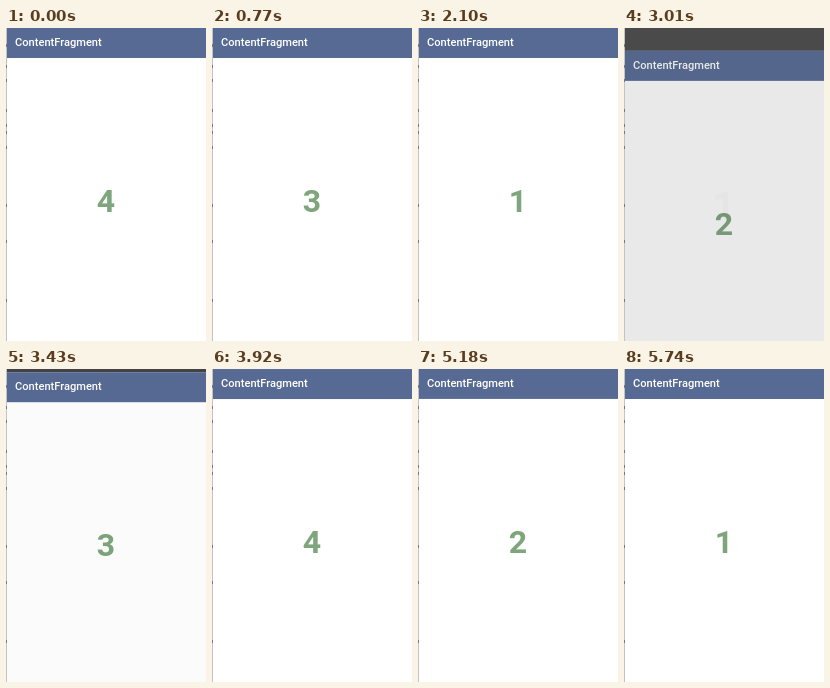
Write an HTML page that moves like this. It is 200 px wide and 313 px high and loops after 5.81 s.

```html
<!DOCTYPE html>
<html lang="en">
<head>
<meta charset="utf-8">
<title>ContentFragment</title>
<style>
  html, body {
    margin: 0;
    width: 100%;
    height: 100%;
    overflow: hidden;
    background: #000;
  }
  #stage {
    position: relative;
    width: 200px;
    height: 313px;
    overflow: hidden;
    background: #000;
    font-family: Roboto, sans-serif;
  }
  .page {
    position: absolute;
    inset: 0;
    background: #fff;
  }
  .bar {
    height: 30px;
    padding-left: 9px;
    background: #566a94;
    color: #fff;
    font-size: 11.1px;
    font-weight: 500;
    line-height: 30px;
    white-space: nowrap;
  }
  .num {
    position: absolute;
    top: 153px;
    width: 100%;
    color: #7ea57b;
    font-size: 32px;
    font-weight: 700;
    line-height: 40px;
    text-align: center;
  }
  .edge {
    position: absolute;
    left: 0;
    top: 0;
    width: 1px;
    height: 100%;
    background: #c3c3c6;
  }
  .edge i {
    position: absolute;
    width: 1px;
    height: 3px;
    background: #77777c;
  }
</style>
</head>
<body>
<div id="stage">
  <div class="page" id="back"><div class="bar">ContentFragment</div><div class="num"></div></div>
  <div class="page" id="front"><div class="bar">ContentFragment</div><div class="num"></div></div>
  <div class="edge" id="edge"></div>
</div>
<script>
const LOOP = 5810, STEP = 70, HEIGHT = 313;

// start ms, duration ms, ease-out power, page left, page reached
const moves = [
  [-1, 1, 1, 3, 4],
  [190, 580, 3, 4, 3],
  [815, 515, 3, 3, 2],
  [1660, 440, 3, 2, 1],
  [2570, 756, 3, 1, 2],
  [3130, 500, 5, 2, 3],
  [3435, 590, 5, 3, 4],
  [4180, 370, 3, 4, 3],
  [4665, 585, 3, 3, 2],
  [5370, 370, 3, 2, 1]
];

const front = document.getElementById('front');
const back = document.getElementById('back');
const edge = document.getElementById('edge');

for (const y of [16, 37, 51, 81, 96, 103, 118, 176, 212, 271]) {
  const tick = document.createElement('i');
  tick.style.top = y + 'px';
  edge.append(tick);
}

function setPage(page, number, opacity, transform) {
  page.lastElementChild.textContent = number;
  page.style.opacity = opacity;
  page.style.transform = transform;
}

function render(t) {
  const [start, duration, power, from, to] = moves.filter(m => m[0] <= t).pop();
  const p = Math.min(1, (t - start) / duration);
  const eased = 1 - (1 - p) ** power;
  const push = to > from;
  const shift = push ? 1 - eased : eased;

  // the upper page slides and fades, the lower one zooms out of the dark
  const fade = Math.max(shift, 0.12 * Math.min(1, shift / 0.06));
  setPage(front, Math.max(from, to), 1 - fade, `translateY(${shift * HEIGHT}px)`);
  setPage(back, Math.min(from, to), 0.26 + 0.74 * shift ** 1.2, `scale(${1.3 - 0.3 * shift})`);
}

const origin = performance.now();
function tick() {
  const t = (performance.now() - origin) % LOOP;
  render(Math.floor(t / STEP) * STEP);
  requestAnimationFrame(tick);
}
tick();
</script>
</body>
</html>
```
